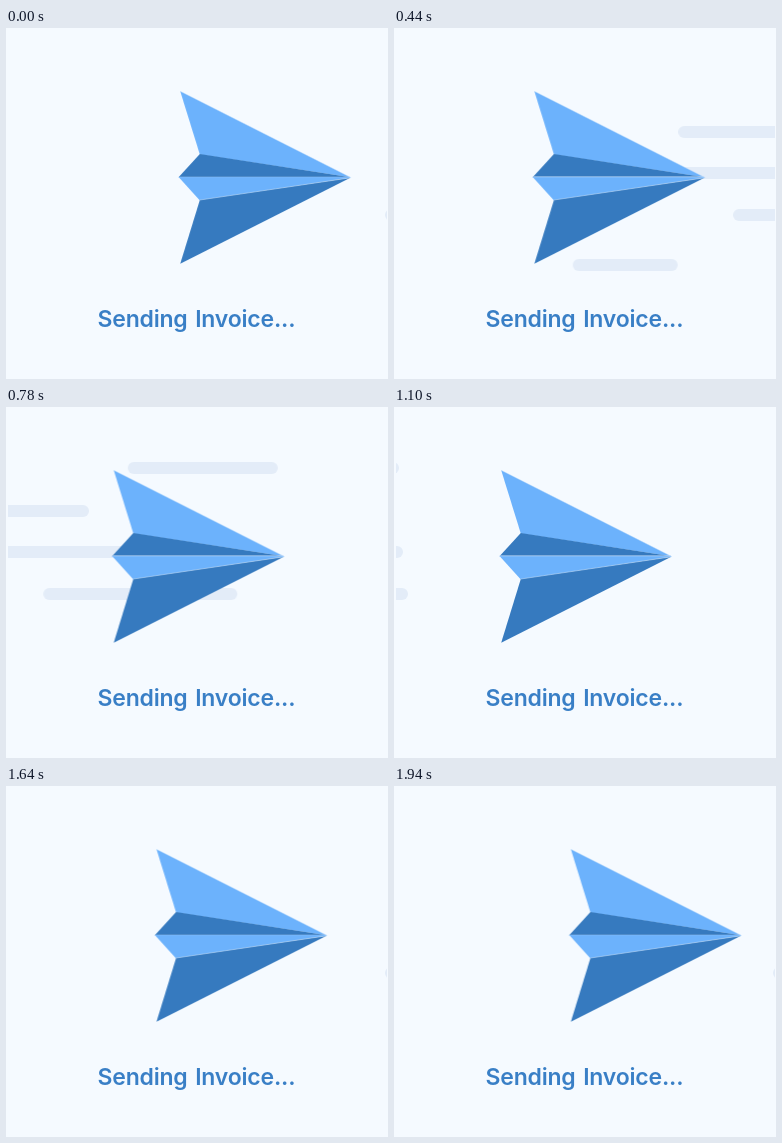
Write an HTML page that moves like this. It is 382 px wide and 351 px high and loops after 1960 ms.

```html
<!DOCTYPE html>
<html lang="en">
<head>
<meta charset="utf-8">
<title>Sending Invoice</title>
<style>
  html, body { margin: 0; width: 100%; height: 100%; overflow: hidden; background: #f5faff; }
  svg { display: block; width: 382px; height: 351px; }
  .light { fill: #6cb2fc; }
  .dark { fill: #367abf; }
  .edge { fill: none; stroke: #c4defa; stroke-width: .8; }
  text { font: 600 23px Inter, "Open Sans", sans-serif; letter-spacing: -.2px; word-spacing: 2px; fill: #397fc6; }
</style>
</head>
<body>
<svg viewBox="0 0 382 351">
  <clipPath id="view"><rect x="2" width="379" height="351"/></clipPath>
  <g id="wind" fill="#e3ecf8" clip-path="url(#view)"></g>
  <g id="plane">
    <path class="light" d="M107.2 63.3L277.3 149.3L126.8 126.5Z"/>
    <path class="dark" d="M126.8 126L277.3 149.3H105.5Z"/>
    <path class="light" d="M105.5 149H277.3V149.7L126.8 172.5Z"/>
    <path class="dark" d="M126.8 172L277.3 149.8L107.2 235.8Z"/>
    <path class="edge" opacity=".5" d="M107.2 63.3L277.3 149.3"/>
    <path class="edge" opacity=".7" d="M277.3 149.8L126.8 172"/>
    <path class="edge" id="crease" d="M105.5 148.8H277"/>
  </g>
  <text x="91.5" y="299">Sending Invoice...</text>
</svg>
<script>
const LOOP = 1960, RESET = 1320, WIND_END = 1100;
const GLIDE = 'cubic-bezier(.36,0,.46,1)';
const GUST = 'cubic-bezier(.33,0,.72,1)';
const SETTLE = 'cubic-bezier(.2,.5,.5,1)';

// steps: [time, value, easing to the next step]
function play(el, prop, steps) {
  const frames = steps.map(([time, value, easing = 'linear']) =>
    ({ offset: time / LOOP, [prop]: value, easing }));
  el.animate(frames, { duration: LOOP, iterations: Infinity });
}

const slide = (el, steps) => play(el, 'transform',
  steps.map(([time, x, easing]) => [time, `translateX(${x}px)`, easing]));

slide(document.getElementById('plane'), [
  [0, 67, SETTLE], [120, 69.7, GLIDE], [840, 0], [RESET, 0, GLIDE], [LOOP, 69.7]
]);

play(document.getElementById('crease'), 'opacity', [
  [0, .35], [120, .35], [120, .95], [RESET, .95], [RESET, .35], [LOOP, .35]
]);

// centre y, length, first x, travel, start time
const streaks = [
  [61, 150, 381, 526, 444],
  [104, 154, 410, 700, 188],
  [145, 322, 381, 694, 100],
  [187, 194, 379, 559, 310],
  [237, 105, 409, 900, 100]
];

for (const [y, length, from, travel, start] of streaks) {
  const bar = document.createElementNS('http://www.w3.org/2000/svg', 'rect');
  const box = { y: y - 6, width: length, height: 12, rx: 6 };
  for (const key in box) bar.setAttribute(key, box[key]);
  document.getElementById('wind').append(bar);
  const to = from - travel;
  slide(bar, [
    [0, from], [start, from, GUST], [WIND_END, to], [RESET, to], [RESET, from], [LOOP, from]
  ]);
}
</script>
</body>
</html>
```
